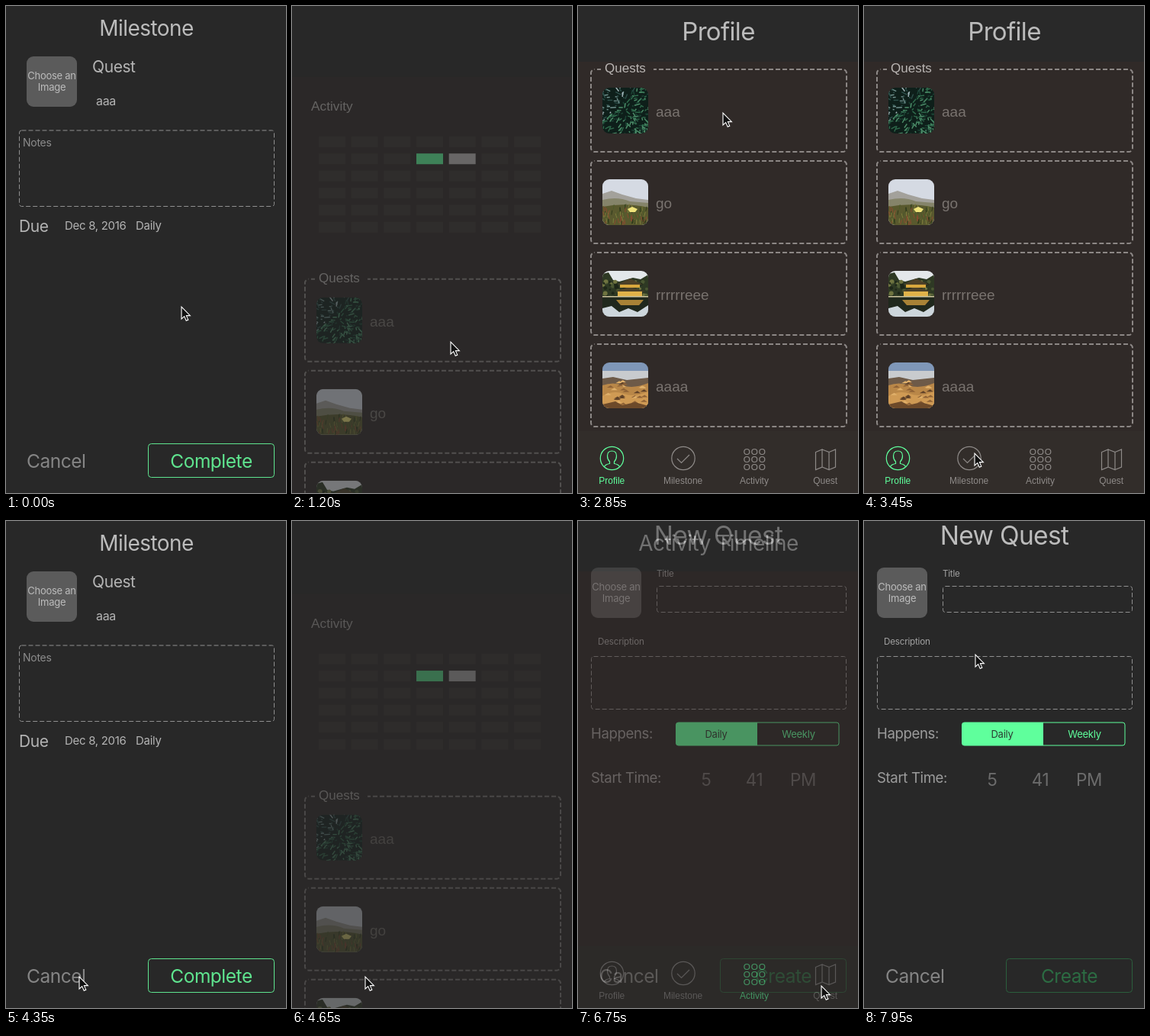
An HTML page that plays this animation: 367x638 px, repeating every 8000 ms.

```html
<!DOCTYPE html>
<html lang="en">
<head>
<meta charset="utf-8">
<title>Quest tracker</title>
<style>
  html, body { margin: 0; width: 100%; height: 100%; overflow: hidden; background: #282828; }
  svg { display: block; }
  text { font-family: Inter, sans-serif; letter-spacing: -.02em; white-space: pre; }
  .helv { font-family: "Liberation Sans", sans-serif; letter-spacing: 0; }
</style>
</head>
<body>
<svg id="stage" width="100%" height="100%" viewBox="0 0 367 638"></svg>
<script>
const LOOP = 8000, TICK = 150;
const BASE = '#282828', BODY = '#302a28', GREEN = '#5fff9c', SOFT_GREEN = '#5fe58f';

// Markup helpers
const text = (x, y, size, str, fill = '#b4b4b4', cls = '', anchor = 'start') =>
  `<text x="${x}" y="${y}" font-size="${size}" fill="${fill}" class="${cls}" text-anchor="${anchor}">${str}</text>`;
const centred = (x, y, size, str, fill, cls) => text(x, y, size, str, fill, cls, 'middle');
const rect = (x, y, w, h, fill, extra = '') =>
  `<rect x="${x}" y="${y}" width="${w}" height="${h}" fill="${fill}" ${extra}/>`;
const path = (d, fill, extra = '') => `<path d="${d}" fill="${fill}" ${extra}/>`;
const circle = (x, y, r, extra = '') => `<circle cx="${x}" cy="${y}" r="${r}" ${extra}/>`;
const group = (id, body) => `<g id="${id}">${body}</g>`;
const range = n => [...Array(n).keys()];
const dashed = (x, y, w, h) =>
  rect(x, y, w, h, 'none', 'rx="3" stroke="#909090" stroke-dasharray="6 3"');
const imagePicker = (x, y) => rect(x, y, 66, 66, '#5b5b5b', 'rx="9"') +
  centred(x + 33, y + 30, 13, 'Choose an', '#bcbcbc') + centred(x + 33, y + 45, 13, 'Image', '#bcbcbc');
const footer = (x, label, line, ink) => text(x, 605, 24.5, 'Cancel', '#858585') +
  rect(186.5, 573.5, 165, 44, 'none', `rx="4" stroke="${line}"`) + centred(269, 605, 24.5, label, ink);

// Thumbnails, each drawn in a 60 x 60 square
let seed = 7;
const random = () => (seed = seed * 16807 % 2147483647) / 2147483647;
const pick = list => list[Math.floor(random() * list.length)];

function forest() {
  const leaves = range(190).map(() => {
    const x = random() * 60, y = random() * 60;
    const angle = Math.atan2(y - 30, x - 30) + (random() - .5) * 2, length = 2 + random() * 6;
    const ink = x + y < 45 ? pick(['#2d4f4a', '#6f8f8c', '#a3b5ba']) : pick(['#1c4435', '#2f6b4c', '#4d8f6a']);
    return `<path d="M${x} ${y}l${Math.cos(angle) * length} ${Math.sin(angle) * length}" stroke="${ink}" stroke-width="1.4"/>`;
  });
  return rect(0, 0, 60, 60, '#0e1f1a') + leaves.join('');
}

function meadow() {
  const blades = range(90).map(() => {
    const x = random() * 60, y = 38 + random() * 24;
    const ink = pick(['#2f3a1c', '#7d7d3c', '#8a4a30', '#4c5a2a']);
    return `<path d="M${x} ${y}l${random() * 4 - 2} -6" stroke="${ink}"/>`;
  });
  return rect(0, 0, 60, 60, '#d5dae3') +
    path('M0 19L12 15L26 20L44 25L60 27V60H0Z', '#a3a19b') +
    path('M0 27Q20 22 36 29L60 31V60H0Z', '#85846a') +
    path('M0 36Q30 30 60 37V60H0Z', '#59592e') + blades.join('') +
    path('M33 39L39 36L46 39L43 43H36Z', '#efe37a');
}

function temple() {
  const foliage = range(60).map(() => {
    const x = random() * 60, y = 14 + random() * 22;
    return circle(x, y, 1 + random() * 2, `fill="${pick(['#1d2618', '#4a5732', '#6f7440'])}"`);
  });
  return rect(0, 0, 60, 60, '#e3e7ea') +
    path('M0 4L8 2L14 12L22 14L40 9L50 11L60 5V38H0Z', '#2e3924') + foliage.join('') +
    path('M20 18L36 10L53 18ZM16 27L36 21L56 27Z', '#4d4128') +
    rect(23, 18, 26, 4, '#d9a83d') + rect(20, 27, 32, 6, '#e0b24a') +
    rect(0, 34, 60, 26, '#20281d') + rect(0, 33, 60, 1.5, '#cfc69f') +
    path('M18 38H54L48 45H24Z', '#a88236') +
    path('M0 49L12 46L22 54L34 49L46 54L60 45V60H0Z', '#cdd6dc');
}

function desert() {
  const rocks = range(30).map(() => {
    const x = random() * 60, y = 26 + random() * 32;
    return path(`M${x} ${y}l5 -3l4 3z`, pick(['#5f4128', '#e0b06a', '#8f6236']));
  });
  return rect(0, 0, 60, 60, '#7f97b8') + rect(0, 11, 60, 12, '#c8cbce') +
    path('M0 21L14 19L32 23L60 20V60H0Z', '#6d5a48') +
    path('M0 30Q14 25 27 30T60 27V60H0Z', '#b98748') +
    path('M0 44Q14 36 28 41T60 38V60H0Z', '#cf9a54') + rocks.join('') +
    path('M0 55L17 51L26 56L43 52L60 57V60H0Z', '#6d4a2a');
}

// Pages
const milestonePage = rect(0, 0, 367, 638, BASE) +
  centred(184, 39, 28, 'Milestone', '#bcbcbc') + imagePicker(27, 66) +
  text(113, 87, 21, 'Quest') + text(118, 130, 16, 'aaa') +
  dashed(17.5, 163, 334, 99.5) + text(22, 184, 14, 'Notes', '#8c8c8c') +
  text(17, 296, 21, 'Due') + text(77, 293, 15, 'Dec 8, 2016') + text(170, 293, 15, 'Daily') +
  footer(27, 'Complete', SOFT_GREEN, SOFT_GREEN);

const newQuestPage = rect(0, 0, 367, 638, BASE) +
  centred(184, 31, 33.5, 'New Quest', '#bcbcbc') + imagePicker(17, 61) +
  text(103, 73, 11.6, 'Title', '#a2a2a2') + dashed(103.5, 85.5, 248, 34) +
  text(26, 161.5, 11.7, 'Description', '#a2a2a2') + dashed(17.5, 177.5, 334, 69) +
  text(17, 285, 18.6, 'Happens:', '#9c9c9c') +
  rect(128.5, 264, 213.5, 30, 'none', `rx="3" stroke="${GREEN}"`) +
  path('M235 264H131.5Q128.5 264 128.5 267V291Q128.5 294 131.5 294H235Z', GREEN) +
  centred(181, 283.5, 13, 'Daily', '#2c3a32') + centred(289, 283.5, 13, 'Weekly', GREEN) +
  text(17, 343, 18.6, 'Start Time:', '#9c9c9c') +
  centred(168, 347, 22.5, '5', '#6c6c6c') + centred(231, 347, 22.5, '41', '#6c6c6c') +
  centred(295, 347, 22.5, 'PM', '#6c6c6c') +
  footer(28, 'Create', '#2b5f3d', '#2c6c43');

const activityGrid = range(42).map(i => {
  const fill = i === 10 ? GREEN : i === 11 ? '#c2bebd' : '#3b3432';
  return rect(35 + i % 7 * 42.67, 151 + Math.floor(i / 7) * 22.4, 35, 14, fill);
}).join('');

const quests = [['aaa', forest], ['go', meadow], ['rrrrrreee', temple], ['aaaa', desert]];
const questCards = quests.map(([name, photo], i) => `<g transform="translate(0 ${i * 120})">` +
  rect(17, 338, 335, 108, 'none',
    'rx="5" stroke="#8c8785" stroke-width="2" stroke-dasharray="6 3" stroke-dashoffset="-3"') +
  `<g transform="translate(32 362)" clip-path="url(#thumb)">${photo()}</g>` +
  text(102, 400, 19, name, '#79736f', 'helv') + '</g>').join('');

const profileBody = rect(0, 73, 367, 600, BODY) + group('scroller',
  text(25, 117, 17.3, 'Activity', '#bab6b4', 'helv') + activityGrid + questCards +
  rect(30, 330, 69, 16, BODY) + text(35, 342, 17, 'Quests', '#bab6b4', 'helv'));

const icons = [
  circle(44.5, 592.5, 15.2) +
    path('M34.5 603.5Q36 600.5 41.5 599.5V597Q38.5 594 38.5 589.500Q38.5 583 44.5 583Q50.5 583 50.5 589.500Q50.5 594 47.5 597V599.500Q53 600.500 54.5 603.500', 'none'),
  circle(138, 592.5, 15.2) + path('M130 593L135.5 598.5L146 588', 'none'),
  range(9).map(i => circle(221.3 + i % 3 * 10, 584 + Math.floor(i / 3) * 10, 3.5)).join(''),
  path('M311.5 584.5L320 581V604L311.5 607.5ZM320 581L329 584.5V607.5L320 604M329 584.5L337.5 581V604L329 607.5', 'none')
];
const tabs = ['Profile', 'Milestone', 'Activity', 'Quest'].map((label, i) =>
  `<g id="icon${i}" fill="none" stroke-width="1.2">${icons[i]}</g>` +
  group('label' + i, centred(44.3 + i * 93.3, 625.5, 12, label, 'currentColor', 'helv'))).join('');

const stage = document.getElementById('stage');
stage.innerHTML =
  `<clipPath id="thumb">${rect(0, 0, 60, 60, '#000', 'rx="9"')}</clipPath>` +
  rect(0, 0, 367, 638, BASE) +
  group('profile', profileBody) +
  group('profileHead', rect(0, 0, 367, 73, '#292929') + centred(184, 45, 33, 'Profile', '#bbb')) +
  group('timeline', rect(0, 66, 367, 572, '#332927') + rect(0, 0, 367, 66, BASE) +
    centred(184, 39, 28, 'Activity Timeline', '#bcbcbc')) +
  group('tabBar', rect(0, 557, 367, 81, '#322d2a') + tabs) +
  group('milestone', milestonePage) + group('newQuest', newQuestPage) +
  group('cursor', path('M0 0V16L3.7 12.6L6.2 18.2L8.8 17.1L6.4 11.6H11.4Z', '#111',
    'stroke="#fff" stroke-width="1.1"'));

// Tracks: [time, value...] with straight runs between keys
const cursorTrack = [
  [0, 230, 394], [150, 236, 440], [450, 252, 600], [600, 252, 600], [1200, 208, 440],
  [2100, 187, 374], [2250, 187, 374], [2400, 187, 350], [2700, 190, 142], [2850, 190, 140],
  [3300, 149, 582], [3450, 145, 586], [4050, 145, 586], [4200, 115, 594], [4350, 96, 597],
  [4650, 96, 597], [4950, 216, 608], [5400, 216, 608], [5700, 272, 609], [5850, 272, 609],
  [6150, 319, 609], [6750, 319, 609], [7500, 170, 90], [7800, 170, 90], [7950, 146, 175]
];
const scrollTrack = [[2250, 0], [2400, 25], [2700, 237], [2850, 255], [3900, 255], [4050, 0]];
const bodyTrack = [[950, 0], [1550, 1], [3900, 1], [4050, 0], [4500, 0], [4950, 1]];
const barTrack = [[1200, 0], [1650, 1], [3900, 1], [4050, 0], [4650, 0], [4950, 1]];
const milestoneTrack = [[600, 1], [900, 0], [3600, 0], [3900, 1], [4350, 1], [4650, 0]];
const newQuestTrack = [[6600, 0], [6900, 1]];
const tintTrack = [[5100, 0], [5250, .2], [5550, 1]];

function sample(track, t) {
  const next = track.findIndex(key => key[0] > t);
  if (next === 0) return track[0].slice(1);
  if (next < 0) return track[track.length - 1].slice(1);
  const a = track[next - 1], b = track[next], p = (t - a[0]) / (b[0] - a[0]);
  return a.slice(1).map((v, i) => v + (b[i + 1] - v) * p);
}

const el = id => document.getElementById(id);
const fade = (id, value) => {
  el(id).style.opacity = value;
  el(id).style.display = value > 0 ? '' : 'none';
};
const move = (id, x, y) => el(id).setAttribute('transform', `translate(${x} ${y})`);
const mix = p => `rgb(${[[142, 95], [138, 255], [136, 156]].map(([a, b]) => Math.round(a + (b - a) * p))})`;

function render(t) {
  const onTimeline = t >= 5250;
  const [body] = sample(bodyTrack, t), [bars] = sample(barTrack, t), [tint] = sample(tintTrack, t);

  fade('profile', onTimeline ? 0 : body);
  move('profile', 0, 34 * (1 - body));
  move('scroller', 0, -sample(scrollTrack, t)[0]);
  fade('profileHead', onTimeline ? 0 : bars);
  fade('timeline', onTimeline ? 1 : 0);
  fade('tabBar', bars);
  fade('milestone', sample(milestoneTrack, t)[0]);
  fade('newQuest', sample(newQuestTrack, t)[0]);

  for (const i of range(4)) {
    const active = i === 0 ? !onTimeline : i === 2 && onTimeline;
    const level = !active ? 0 : i === 0 ? 1 : tint;
    el('icon' + i).setAttribute('stroke', mix(level));
    el('label' + i).style.color = mix(level < .5 ? 0 : level);
  }
  move('cursor', ...sample(cursorTrack, t));
}

// The screen advances in steps of TICK
function frame() {
  const t = performance.now() % LOOP;
  render(Math.floor(t / TICK) * TICK);
  requestAnimationFrame(frame);
}
frame();
</script>
</body>
</html>
```
